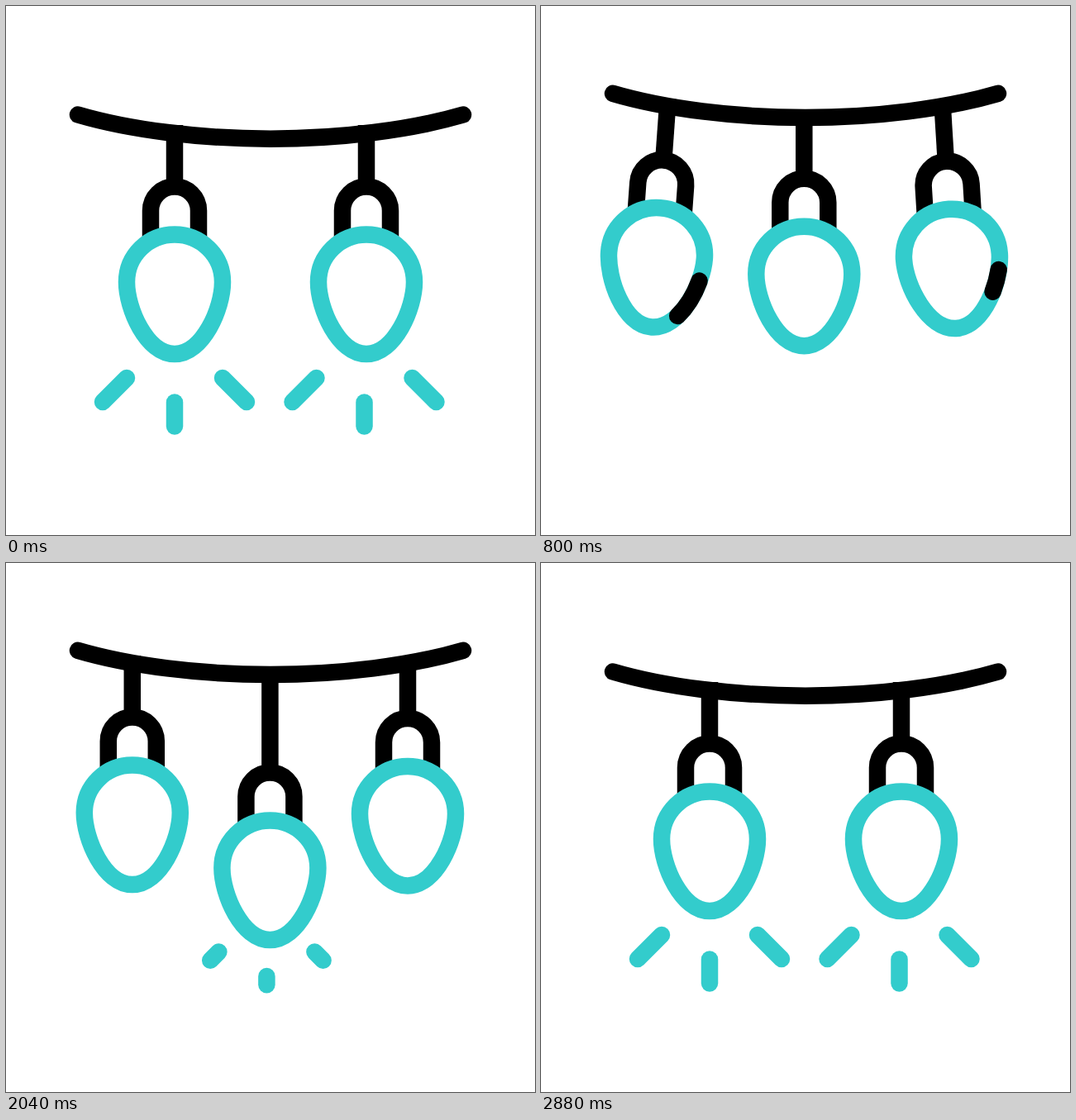
Recreate the animation shown at these times as an HTML page. Size 640x640 px, loop 3000 ms.

```html
<!DOCTYPE html>
<html lang="en">
<head>
<meta charset="utf-8">
<title>String lights</title>
<style>
  html, body { margin: 0; width: 100%; height: 100%; overflow: hidden; background: #fff; }
  svg { display: block; width: 100%; height: 100%; }
  path { fill: none; stroke: #000; stroke-width: 20.5; }
  .glow { stroke: #33cccc; }
  .round { stroke-linecap: round; }
</style>
</head>
<body>
<svg viewBox="0 0 640 640">
  <defs>
    <clipPath id="below"><path d="M87 131.5C150 150 235 160.7 320 160.7S490 150 553 131.5V700H87Z"/></clipPath>
  </defs>
  <g id="scene">
    <g id="sides"></g>
    <g id="middle" clip-path="url(#below)"></g>
    <path class="round" d="M87 131.5C150 150 235 160.7 320 160.7S490 150 553 131.5"/>
  </g>
</svg>
<script>
const LOOP = 3000, STEP = 40, LEAD = 3, LAST = 69;
const PERIM = 404, RAY = 29, HANG = -178;
const BULB = 'M0-57.5C32-57.5 58-32 58 0C58 32 34 87 0 87C-34 87-58 32-58 0C-58-32-32-57.5 0-57.5Z';

const $ = id => document.getElementById(id);

function add(parent, tag, attrs = {}) {
  const el = document.createElementNS('http://www.w3.org/2000/svg', tag);
  for (const name in attrs) el.setAttribute(name, attrs[name]);
  return parent.appendChild(el);
}

// Eased value at step k from [step, value] keys.
function track(k, keys) {
  if (k <= keys[0][0]) return keys[0][1];
  for (let i = 1; i < keys.length; i++) {
    const [k0, v0] = keys[i - 1], [k1, v1] = keys[i];
    if (k < k1) {
      const u = (k - k0) / (k1 - k0);
      return v0 + (v1 - v0) * u * u * (3 - 2 * u);
    }
  }
  return keys[keys.length - 1][1];
}

const ramp = (k, start, span) => track(k, [[start, 0], [start + span, 1]]);

// Local origin: the middle of the widest part of the bulb.
function makeLight(parent, stringTop, rayX, rayY) {
  const g = add(parent, 'g');
  add(g, 'path', { d: `M0 ${stringTop}V-115` });
  add(g, 'path', { d: 'M-29-50V-86.5A29 29 0 0 1 29-86.5V-50' });
  add(g, 'path', { d: BULB, class: 'glow' });
  const band = add(g, 'path', { d: BULB, class: 'round', pathLength: PERIM });
  const rays = [-1, 0, 1].map(side => ({
    el: add(g, 'path', { class: 'glow round' }),
    x: rayX + side * 58, y: rayY + (side ? 0 : 29.5), side
  }));
  return { g, band, rays };
}

function place(light, x, y, angle = 0) {
  light.g.setAttribute('transform', `translate(${x} ${y}) rotate(${angle} 0 ${HANG})`);
}

function setRays(light, amount) {
  const len = RAY * amount;
  for (const { el, x, y, side } of light.rays) {
    el.style.display = len > 0.05 ? '' : 'none';
    el.setAttribute('d', `M${x} ${y}l${side * len} ${len}`);
  }
}

function setBand(light, from, to, shift) {
  const len = (to - from) * PERIM;
  light.band.style.display = len > 0.05 ? '' : 'none';
  light.band.style.strokeDasharray = `${len} ${PERIM - len}`;
  light.band.style.strokeDashoffset = -((shift + from * PERIM) % PERIM);
}

const sides = [
  { x: 204, dx: -51.2, dy: -6.2, sway: 1, lag: 0, fill: 13.4, clear: 29, shift: 63.2, rayX: 0 },
  { x: 436, dx: 50, dy: -4.8, sway: -0.925, lag: 0.12, fill: 14.4, clear: 30.7, shift: 55.3, rayX: -2.5 }
];
for (const s of sides) s.light = makeLight($('sides'), -190, s.rayX, 116);

const middle = makeLight($('middle'), -600, -4, 101.5);
setBand(middle, 0, 0, 0);

const ROPE = [[0, 0], [10.6, -25.7], [58.4, -25.7], [69, 0]];
const SPREAD = [[0, 0], [16.8, 1], [56, 1], [69, 0]];
const SWING = [[0, 0], [12.2, -4.1], [21.9, 12.6], [35.5, 0]];
const SIDE_RAYS = [[3, 1], [15, 0], [51.6, 0], [57.6, 1]];
const MID_X = [[17, 318.3], [25, 319.4], [48, 319.4], [56, 318.3]];
const MID_Y = [[0, 24], [25, 453.7], [38, 394.7], [50.6, 394.7], [69, 24]];
const MID_RAYS = [[23.5, 0], [29.5, 1], [42, 1], [52, 0]];

function draw(k) {
  $('scene').setAttribute('transform', `translate(0 ${track(k, ROPE)})`);
  const spread = track(k, SPREAD), glow = track(k, SIDE_RAYS);
  for (const s of sides) {
    const angle = s.sway * track(k - s.lag, SWING);
    place(s.light, s.x + s.dx * spread, 334 + s.dy * spread, angle);
    setRays(s.light, glow);
    setBand(s.light, ramp(k, s.clear, 16.5), ramp(k, s.fill, 16.4), s.shift + 3.18 * k);
  }
  place(middle, track(k, MID_X), track(k, MID_Y));
  setRays(middle, track(k, MID_RAYS));
}

const begin = performance.now();
function tick() {
  const t = (performance.now() - begin) % LOOP;
  draw(Math.min(LAST, Math.max(0, Math.floor(t / STEP) - LEAD)));
  requestAnimationFrame(tick);
}
tick();
</script>
</body>
</html>
```
